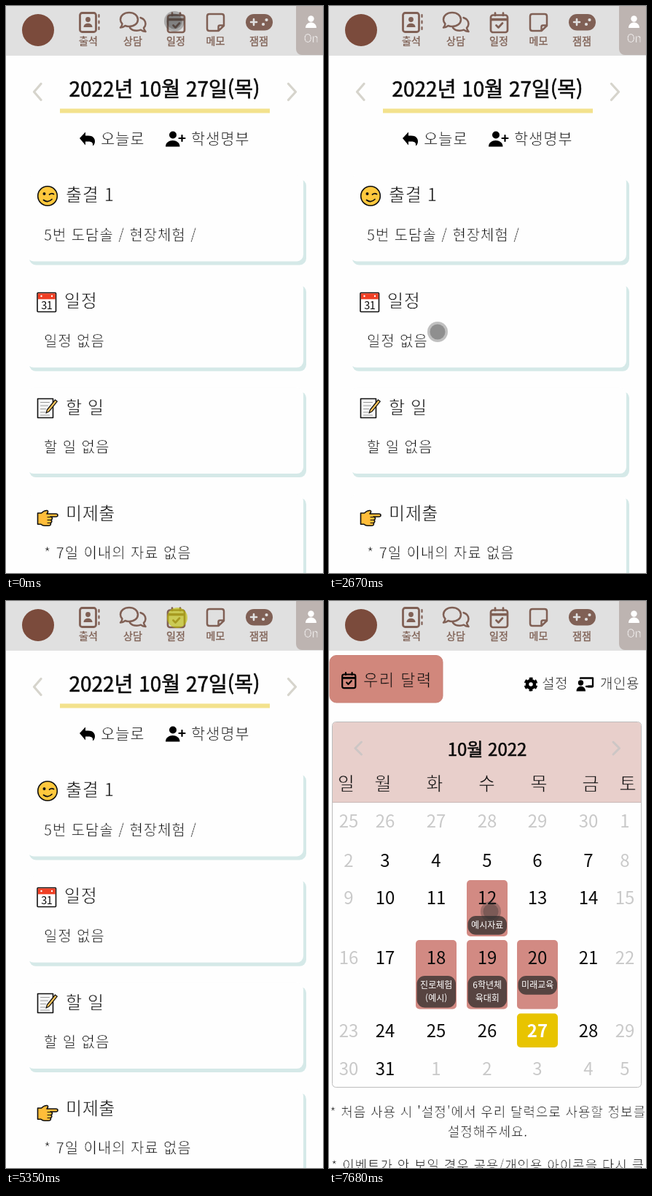
Animation of 435x776 px, one loop 8 s. Source, as an HTML page:

```html
<!DOCTYPE html>
<html lang="ko">
<head>
<meta charset="utf-8">
<style>
  html, body { margin: 0; width: 100%; height: 100%; overflow: hidden; background: #fefefe; }
  svg { display: block; width: 435px; height: 776px; }
  text {
    font-family: "Noto Sans CJK KR", "Noto Sans CJK JP", "Noto Sans CJK", "Noto Sans", sans-serif;
    font-weight: 400; fill: #0b0b0b; white-space: pre;
  }
  .mid { text-anchor: middle; }
  .strong { stroke: #0b0b0b; stroke-width: .6px; }
  /* a stroke in the background colour slims the letters */
  .thin { stroke: #fefefe; stroke-width: .65px; }
  .on-rose { stroke: #d1877c; }
  .on-pink { stroke: #e8cfcb; }
  .on-grey { stroke: #bdb4b1; }
  .pale { fill: #c9c9c9; }
  .tab { fill: #806357; stroke: #806357; stroke-width: .35px; }
  .chip { fill: #fff; }
  .today { fill: #fff; font-weight: 700; }
  .line { fill: none; stroke-linecap: round; stroke-linejoin: round; }
</style>
</head>
<body>
<svg viewBox="0 0 435 776">
  <defs>
    <g id="check" class="line" stroke-width="2.7">
      <rect x="1.5" y="4.500" width="23" height="23.500" rx="3"/>
      <path d="M2 10.500H24" stroke-width="3.6" stroke-linecap="butt"/>
      <path d="M7.500 1.500V5M18.500 1.500V5M9 18.500l3 3 5.500-6"/>
    </g>
  </defs>
  <rect width="435" height="776" fill="#fefefe"/>
  <g id="diary"></g>
  <g id="calendar"></g>
  <g id="header"></g>
  <g id="pointer"><circle r="14"/><circle r="10.5"/></g>
</svg>
<script>
const $ = id => document.getElementById(id);
const text = (x, y, size, str, cls = '', gap = 0) =>
  `<text x="${x}" y="${y}" font-size="${size}" class="${cls}" letter-spacing="${gap}">${str}</text>`;
const box = (x, y, w, h, r, fill, more = '') =>
  `<rect x="${x}" y="${y}" width="${w}" height="${h}" rx="${r}" fill="${fill}" ${more}/>`;
const dot = (x, y, r, fill, more = '') => `<circle cx="${x}" cy="${y}" r="${r}" fill="${fill}" ${more}/>`;
const line = (d, color, width) => `<path class="line" d="${d}" stroke="${color}" stroke-width="${width}"/>`;
const fill = (d, color, more = '') => `<path d="${d}" fill="${color}" ${more}/>`;

// Header
const brown = '#806055', bar = '#e0e0e0';
const tabs = [['출석', 113], ['상담', 174], ['일정', 233], ['메모', 287.5], ['잼잼', 347]];
$('header').innerHTML =
  box(0, 0, 435, 68, 0, bar) +
  dot(44, 33, 22, '#7b4b3c') +
  // address book
  box(101.5, 9.5, 22, 26, 3, 'none', `stroke="${brown}" stroke-width="2.8"`) +
  dot(112.5, 18.5, 3.4, brown) +
  fill('M106.5 29c0-7 12-7 12 0z', brown) +
  line('M127.5 12v3M127.5 20.5v3M127.5 29v3', brown, 2.2) +
  // speech bubbles
  line('M169 9c7 0 12 4 12 9.5s-5 9.5-12 9.5q-3 0-5.5-1-3 2.5-6.5 2.5 2.3-2.5 2.5-5-2.5-2.5-2.5-6c0-5.5 5-9.5 12-9.5z', brown, 2.5) +
  line('M184.5 16c4.5 1.5 7 4.5 7 8.500q0 3-2.5 5.500.5 3 2.500 5-4 0-6.500-2.300-2.500 1-5.500 1c-5 0-8-2-9.500-4', brown, 2.5) +
  `<use href="#check" x="220.5" y="8" stroke="${brown}"/>` +
  // sticky note
  line('M279 11h17q3 0 3 3v13l-7.5 7H279q-3 0-3-3V14q0-3 3-3zM299 26.5h-5.5q-2 0-2 2V34', brown, 2.5) +
  // game controller
  box(329, 11, 37, 22.5, 11.2, brown) +
  line('M340 18v8M336 22h8', bar, 2.6) +
  dot(353, 25, 2.1, bar) + dot(357.5, 19, 2.1, bar) +
  tabs.map(([name, x]) => text(x, 52.5, 14, name, 'mid tab')).join('') +
  box(398, -6, 45, 73, 8, '#bdb4b1') +
  dot(418.5, 17.5, 4.2, '#fff') +
  fill('M411 30c0-10 15-10 15 0z', '#fff') +
  text(418.5, 50, 15.5, 'On', 'mid chip thin on-grey', -.5);

// Diary screen
const ink = '#111';
const outline = `stroke="${ink}" stroke-width="1.6" stroke-linejoin="round"`;
const wink =
  dot(57, 260, 13.3, '#ffc83d', outline) +
  dot(52.5, 257, 2, ink) +
  line('M59.5 258q3-2.5 6-.5M51.5 265.5q6 4.500 11.500-1', ink, 1.7);
const dateIcon =
  box(43, 392.5, 25.5, 26, 1, '#fff', outline) +
  box(43.8, 393.3, 24, 8, 0, '#ef3f24') +
  dot(48.5, 397, 1.2, '#fff') + dot(63, 397, 1.2, '#fff') +
  text(55.8, 414.5, 14.5, '31', 'mid', -.5);
const memo =
  fill('M43.5 537.5h21v26h-21z', '#f7f7f7', outline) +
  line('M47.5 542.5h12M47.5 547h10M47.5 551.5h7M47.5 556h6M47.5 560h12', '#9a9a9a', 1.1) +
  fill('M55 557l1.5-4.500 11-13.500 2.800 2.200-11 13.500z', '#ffc55a', 'stroke="#111" stroke-width="1.2" stroke-linejoin="round"');
const hand = '<g transform="translate(0 2)">' +
  fill('M43.5 692h5q4-4 8-3.5 2.5 1-.5 4.5h12.5q2.5 0 2.5 2t-2.5 2H61q2.5.5 2.5 2.3t-2 2.200q1.500.700 1.300 2.200t-2 1.800q1 .8.500 2.200t-3 1.500H53q-3 0-5-2h-4.500z', '#ffbd3a', outline) +
  line('M57 697.5h4M57 701.5h4M57 705.5h3', ink, 1) + '</g>';

const cards = [
  ['출결 1', 82, '5번 도담솔 / 현장체험 /', wink],
  ['일정', 80, '일정 없음', dateIcon],
  ['할 일', 82, '할 일 없음', memo],
  ['미제출', 82, '* 7일 이내의 자료 없음', hand],
];
const card = ([title, x, body, icon], i) => {
  const y = 237 + i * 145.3;
  return box(32, y, 380, 117.5, 9, '#d5e9e8') + box(29, y - 5, 379, 117.5, 9, '#fefefe') +
    icon + text(x, y + 30, 24, title, 'thin', .6) + text(52, y + 83.5, 20, body, 'thin', .9);
};
$('diary').innerHTML =
  line('M48 106.5L38.5 117.5 48 128.5M387.5 106.5L397.5 117.5 387.5 128.5', '#d6d4cc', 3.2) +
  text(217.5, 123.5, 28, '2022년 10월 27일(목)', 'mid strong') +
  box(74, 140.5, 288, 6, 0, '#f3e28d') +
  fill('M101 181l8-8.5v5h4c6 0 9 3.500 9 8 0 3-1.500 5-3 6 .7-4-1-6-6-6h-4v5z', '#000') +
  text(130, 189, 21, '오늘로', 'thin', .8) +
  dot(229, 176.5, 5, '#000') +
  fill('M219 192.5c0-11.5 19.5-11.5 19.5 0z', '#000') +
  line('M241.5 177v8M237.5 181h8', '#000', 2.2) +
  text(254, 189, 21, '학생명부', 'thin', .8) +
  cards.map(card).join('');

// Calendar screen
const rose = '#d28a83';
const columns = [27, 77, 147, 217, 286, 356, 406];
const rows = [310, 363.5, 415, 497, 597, 649];
const weekdayX = [23.5, 74, 145, 216.5, 288, 359, 410];
const weekdays = [...'일월화수목금토'].map((day, i) =>
  text(weekdayX[i], 259, 25, day, 'mid thin on-pink')).join('');

const days = Array.from({ length: 42 }, (_, i) => {
  const date = new Date(2022, 8, 25 + i), n = date.getDate(), col = i % 7;
  const inMonth = date.getMonth() === 9;
  const weekend = col === 0 || col === 6;
  const look = !inMonth || weekend ? 'pale' : n === 27 ? 'today' : '';
  return text(columns[col], rows[i / 7 | 0], 24, n, 'mid ' + look);
}).join('');

const events = [
  [189, 382, 77, ['예시자료']],
  [119, 464, 94.5, ['진로체험', '(예시)']],
  [189, 464, 94.5, ['6학년체', '육대회']],
  [258, 464, 94.5, ['미래교육']],
];
const cells = events.map(([x, y, h]) => box(x, y, 56, h, 5, rose)).join('');
const labels = events.map(([x, y, , words]) =>
  box(x + 1.5, y + 49, 53.5, 8 + 17.7 * words.length, 11, '#574441') +
  words.map((word, i) => text(x + 28.2, y + 66.3 + 18 * i, 12, word, 'mid chip')).join('')).join('');

$('calendar').innerHTML =
  box(1, 74.5, 155, 64.5, 9, '#d1877c', 'stroke="#c98177"') +
  '<use href="#check" transform="translate(17 97) scale(.79)" stroke="#000"/>' +
  text(47, 115.5, 22, '우리 달력', 'thin on-rose', 1.5) +
  // gear
  dot(277, 114, 5, 'none', 'stroke="#000" stroke-width="4.5"') +
  dot(277, 114, 7.7, 'none', 'stroke="#000" stroke-width="3.4" stroke-dasharray="4.5 3.56" transform="rotate(13 277 114)"') +
  text(292, 120, 19, '설정', 'thin', .4) +
  // person at a board
  line('M345 106v-.5h17v11.5h-9', '#000', 2.3) +
  line('M356 117h5', '#000', 3) +
  dot(345.5, 112, 3.7, '#000') +
  fill('M339.5 123.5c0-9 12.5-9 12.5 0z', '#000') +
  text(372, 120, 19, '개인용', 'thin', .5) +
  box(4.5, 165.5, 424, 500, 5, '#fefefe', 'stroke="#bcbcbc"') +
  fill('M5 275V171q0-5 5-5h413q5 0 5 5v104z', '#e8cfcb') +
  line('M5 275.5H428', '#c9b8b6', 1) +
  line('M44.5 193l-8.5 8.5 8.5 8.5M390 193l8.5 8.5-8.5 8.5', '#cdc6c5', 3) +
  text(217, 212, 24, '10월 2022', 'mid strong') +
  weekdays + cells + box(258, 564.5, 56, 46.5, 5, '#e8c400') + days + labels +
  text(218, 706, 18, "* 처음 사용 시 '설정'에서 우리 달력으로 사용할 정보를", 'mid thin', .85) +
  text(218, 733, 18, '설정해주세요.', 'mid thin', .85) +
  text(218, 779, 18, '* 이벤트가 안 보일 경우 공용/개인용 아이콘을 다시 클', 'mid thin', .85);

// Pointer steps: time, x, y
const steps = [
  [0, 231, 21], [360, 244, 41], [660, 219, 30], [990, 244, 39], [1340, 220, 24],
  [1670, 238, 29], [2010, 237, 29], [2340, 173, 274], [2670, 149, 446], [3000, 93, 411],
  [3340, 113, 477], [3690, 132, 406], [4020, 107, 473], [4350, 111, 451], [4680, 231, 24],
  [5010, 235, 24], [5350, 235, 23], [5680, 235, 23], [6690, 246, 92], [7020, 230, 449],
  [7350, 221, 418], [7680, 222, 425],
];
const LOOP = 8000, PRESS = 5350, OPEN = 5680;
const pointer = $('pointer'), [halo, core] = pointer.children;
const start = performance.now();

function draw() {
  const t = Math.max(0, performance.now() - start) % LOOP;
  const [, x, y] = steps.findLast(step => step[0] <= t);
  const pressed = t >= PRESS && t < OPEN;
  pointer.setAttribute('transform', `translate(${x} ${y})`);
  halo.setAttribute('fill', pressed ? 'rgba(190,190,0,.62)' : 'rgba(50,50,50,.3)');
  core.setAttribute('fill', pressed ? 'none' : 'rgba(50,50,50,.34)');
  $('diary').style.display = t < OPEN ? '' : 'none';
  $('calendar').style.display = t < OPEN ? 'none' : '';
  requestAnimationFrame(draw);
}
draw();
</script>
</body>
</html>
```
